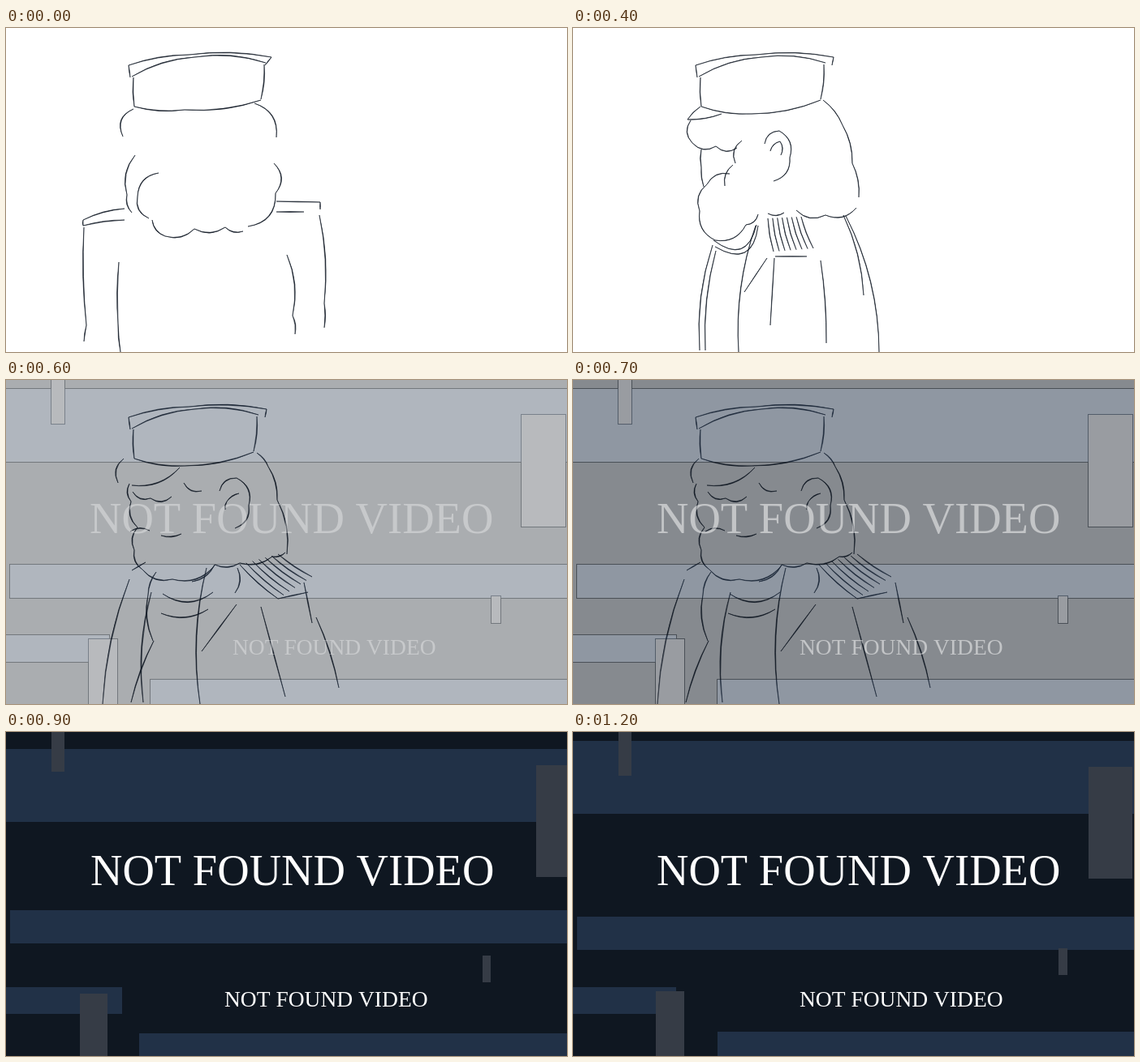
Write an HTML page with a canvas that moves like this. It is 691 px wide and 400 px high and loops after 1300 ms.

```html
<!DOCTYPE html>
<html lang="en">
<head>
<meta charset="utf-8">
<title>Not found video</title>
<style>
html, body { margin: 0; width: 100%; height: 100%; overflow: hidden; background: #fff; }
canvas { display: block; }
</style>
</head>
<body>
<canvas id="stage" width="691" height="400"></canvas>
<script>
const W = 691, H = 400, STEP = 100, STEPS = 13;
const INK = '#0f1723', DARK = '#0f1721', BAND = '#213147', GREY = '#363c46';
const ctx = document.getElementById('stage').getContext('2d');

const layer = () => Object.assign(document.createElement('canvas'), { width: W, height: H }).getContext('2d');
const fills = layer(), edges = layer();

let weight = 1, shiftX = 0, shiftY = 0;
const shift = (x = 0, y = 0) => { shiftX = x; shiftY = y; };
const mix = (a, b, k) => a + (b - a) * k;

// Chain of tapered pen arcs; a positive bulge bends outwards when going clockwise
function arcs(bulge, ...pts) {
  for (let i = 0; i + 3 < pts.length; i += 2) {
    const x0 = pts[i] + shiftX, y0 = pts[i + 1] + shiftY;
    const x1 = pts[i + 2] + shiftX, y1 = pts[i + 3] + shiftY;
    const nx = y1 - y0, ny = x0 - x1, pen = weight / (Math.hypot(nx, ny) || 1);
    const bend = k => [(x0 + x1) / 2 + k * nx, (y0 + y1) / 2 + k * ny];
    ctx.beginPath();
    ctx.moveTo(x0, y0);
    ctx.quadraticCurveTo(...bend(2 * bulge + pen), x1, y1);
    ctx.quadraticCurveTo(...bend(2 * bulge - pen), x0, y0);
    ctx.fill();
    ctx.stroke();
  }
}

// Fringe: n lines spread from the edge a-b to the edge c-d
function fringe(n, ax, ay, bx, by, cx, cy, dx, dy) {
  for (let i = 0; i < n; i++) {
    const k = i / (n - 1);
    arcs(-0.03, mix(ax, bx, k), mix(ay, by, k), mix(cx, dx, k), mix(cy, dy, k));
  }
}

function cap(step) {
  const turn = Math.min(step / 4, 1), right = mix(314, 305, turn);
  arcs(0.04, 151, 46, 225, 33, mix(327, 321, turn), 36);
  arcs(0.06, 155, 60, 232, 36, right + 6, 43);
  arcs(0, 151, 46, 153, 61);
  arcs(0, mix(327, 321, turn), 36, 319, 46);
  arcs(0.03, 158, 97, 157, 61);
  arcs(0.04, right + 4, 45, right, 88);
  arcs(-0.05, 158, 97, 220, mix(101, 106, turn), right, 89);
}

function backView(u) {
  arcs(-0.25, 157, 100, 144, 134);
  arcs(0.2, 306, 93, 333, 135);
  arcs(-0.13, 159, 157, 149, 206, 155, 228);
  arcs(0.22, 330, 167, 332, 204, 298, 245);
  arcs(-0.15, 180, 237, 196, 257, 232, 248, 270, 246, 292, 251);
  shift(20 * u);
  arcs(0.2, 176, 235, 162, 208, 188, 179);
  arcs(0.05, 95, 244, 95, 237, 146, 223);
  arcs(0.03, 95, 244, 146, 237);
  arcs(-0.02, 96, 246, 99, 367, 96, 387);
  arcs(-0.02, 139, 289, 138, 365, 141, 400);
  shift(-15 * u);
  arcs(0, 333, 214, 387, 215, 387, 224);
  arcs(0, 333, 227, 367, 227);
  arcs(0.08, 346, 280, 353, 355, 356, 378);
  arcs(0.04, 386, 231, 392, 340, 392, 370);
}

function profile(u) {
  const open = Math.max(u, 0);
  shift(-7 * open, 4 * open);
  arcs(-0.05, 157, 97, 141, 113, 183, 106);
  shift(0, 3 * open);
  arcs(-0.2, 145, 114, 147, 142, 176, 146, 202, 148);
  shift();
  arcs(-0.05, 158, 150, 158, 172, 161, 196);
  shift(10 * u, -4 * open);
  arcs(-0.2, 208, 139, 200, 167);
  arcs(-0.15, 197, 169, 187, 195);
  shift(3 * open, -4 * open);
  arcs(-0.18, 193, 180, 165, 193, 156, 226, 175, 262, 213, 243 + 11 * open, 228 + 27 * open, 230 - 4 * open);
  shift(14 * u, -3 * open);
  arcs(0.2, 236, 143, 254, 127, 267, 160, 247, 189);
  arcs(0.15, 243, 152, 255, 140, 256, 157);
  shift(7 * u, 5 * open);
  arcs(0.07, 308, 89, 332, 120, 344, 167, 352, 209);
  shift(-9 * open, -2 * open);
  arcs(-0.15, 240 + 21 * open, 229, 260 + 9 * open, 228);
  arcs(-0.18, 275, 225 - 12 * open, 311, 231, 349, 222);
  shift(8 * u, 10 * open);
  arcs(-0.38, 173, 262, 226, 243);
  arcs(-0.38, 175, 270, 228, 244);
  shift(-4 * open, -8 * open);
  arcs(-0.05, 172, 268, 156, 398);
  arcs(-0.04, 176, 275, 163, 398);
  shift(13 * u, 6 * open);
  arcs(-0.05, 225, 244, 204, 400);
  arcs(0, 211, 326, 239, 284);
  shift();
  fringe(8, 240 + 16 * u, 235, 281 + 51 * u, 233, 247 + 34 * u, 276, 296 + 51 * u, 272);
  shift(28 * u);
  arcs(0, 249, 282, 288, 282);
  shift(38 * u, 4 * open);
  arcs(0, 248, 284, 243, 367 - 42 * open);
  if (u < 1) arcs(0.02, 305, 287, 312, 389);
  shift();
  arcs(0.05, 333 + 14 * u, 231 + 40 * open, 358 + 6 * u, 330);
  arcs(0.06, 336 + 23 * open, 232 + 60 * open, 377, 400);
}

function threeQuarter(u) {
  shift(10 * u);
  arcs(-0.2, 155, 97, 148, 127);
  arcs(-0.13, 165, 130, 224, 108);
  arcs(-0.2, 166, 138, 188, 146, 214, 144);
  arcs(-0.2, 229, 127, 251, 137);
  arcs(0.15, 163, 187, 187, 186);
  arcs(-0.1, 201, 192, 226, 190);
  shift();
  arcs(-0.16, 152, 128, 154, 150, 162, 182, 158, 210, 168, 234, 205, 246, 257, 229);
  shift(18 * u);
  arcs(0.2, 281, 137, 302, 121, 317, 155, 300, 183);
  arcs(0.1, 288, 160, 290, 150, 305, 140);
  shift();
  arcs(0.08, 309, 90, 323, 107, 334, 148, 346, 215);
  arcs(-0.13, 229, 249, 257, 228, 288, 226, 328, 218, 344, 213);
  arcs(-0.18, 193, 264, 255, 262);
  arcs(-0.13, 191, 288, 249, 283);
  shift(-15 * u);
  arcs(0, 140, 235, 157, 225);
  arcs(-0.04, 137, 246, 104, 400);
  arcs(-0.08, 170, 237, 160, 265, 166, 322);
  arcs(-0.03, 167, 322, 139, 398);
  shift(15 * u);
  arcs(-0.05, 194, 262, 184, 398);
  arcs(0, 256, 335, 299, 277);
  arcs(-0.05, 262, 232, 254, 400);
  arcs(0.15, 300, 232, 297, 263);
  fringe(7, 303, 228, 350, 215, 350, 270, 392, 243);
  arcs(0, 350, 270, 387, 262);
  shift(30 * u);
  arcs(0, 344, 280, 374, 391);
  arcs(0, 397, 250, 407, 300);
  arcs(0.03, 412, 293, 440, 380);
}

function drawFigure(step) {
  ctx.fillStyle = ctx.strokeStyle = INK;
  ctx.lineWidth = 0.6;
  ctx.lineJoin = 'round';
  weight = step < 2 ? 0.8 : step < 5 ? 0.5 : step < 6 ? 1.2 : 0.9;
  shift();
  cap(step);
  if (step < 2) backView(step);
  else if (step < 6) profile(step - 4);
  else threeQuarter(Math.min(step - 7, 0));
}

function panel(color, x, y, w, h) {
  fills.fillStyle = color;
  fills.fillRect(x, y, w, h);
  edges.clearRect(x, y, w, h);
  edges.strokeRect(x - 0.5, y - 0.5, w + 1, h + 1);
}

function title(x, y, size) {
  ctx.font = `${size}px "Liberation Serif", "Times New Roman", serif`;
  ctx.fontKerning = 'none';
  ctx.fillText('NOT FOUND VIDEO', x, y);
}

// The panels jump between two layouts: j is 0 or 1
function drawPanels(j, alpha) {
  fills.fillStyle = DARK;
  fills.fillRect(0, 0, W, H);
  edges.clearRect(0, 0, W, H);
  edges.strokeStyle = DARK;
  panel(BAND, -9, 11 + 10 * j, 720, 90);
  panel(BAND, 5, 228 - 8 * j, 720, 41);
  panel(BAND, -9, 315, 136 + 16 * j, 33);
  panel(BAND, 178 - 14 * j, 370 + 2 * j, 720, 60);
  panel(GREY, 56, -9, 16, 63 - 5 * j);
  panel(GREY, 635 + 18 * j, 43 - 2 * j, 54, 138);
  panel(GREY, 598 - 11 * j, 267 + 9 * j, 11 - j, 33);
  panel(GREY, 102 - 11 * j, 320 + 3 * j, 35 - j, 99);
  ctx.globalAlpha = alpha;
  if (alpha < 1) ctx.drawImage(edges.canvas, 0, 0);
  ctx.drawImage(fills.canvas, 0, 0);
  ctx.fillStyle = '#fff';
  title(103 + j, 189, 54.6);
  title(279 - 10 * j, 338.5, 27.5);
  ctx.globalAlpha = 1;
}

function render(now) {
  const step = Math.floor(now / STEP) % STEPS;
  ctx.fillStyle = '#fff';
  ctx.fillRect(0, 0, W, H);
  if (step < 9) drawFigure(step);
  if (step > 4) {
    const jumped = step === 8 || step === 9 || step === 11;
    drawPanels(jumped ? 1 : 0, step < 9 ? 0.2 + 0.15 * (step - 5) : 1);
  }
}

function loop() {
  render(performance.now());
  requestAnimationFrame(loop);
}
loop();
</script>
</body>
</html>
```
